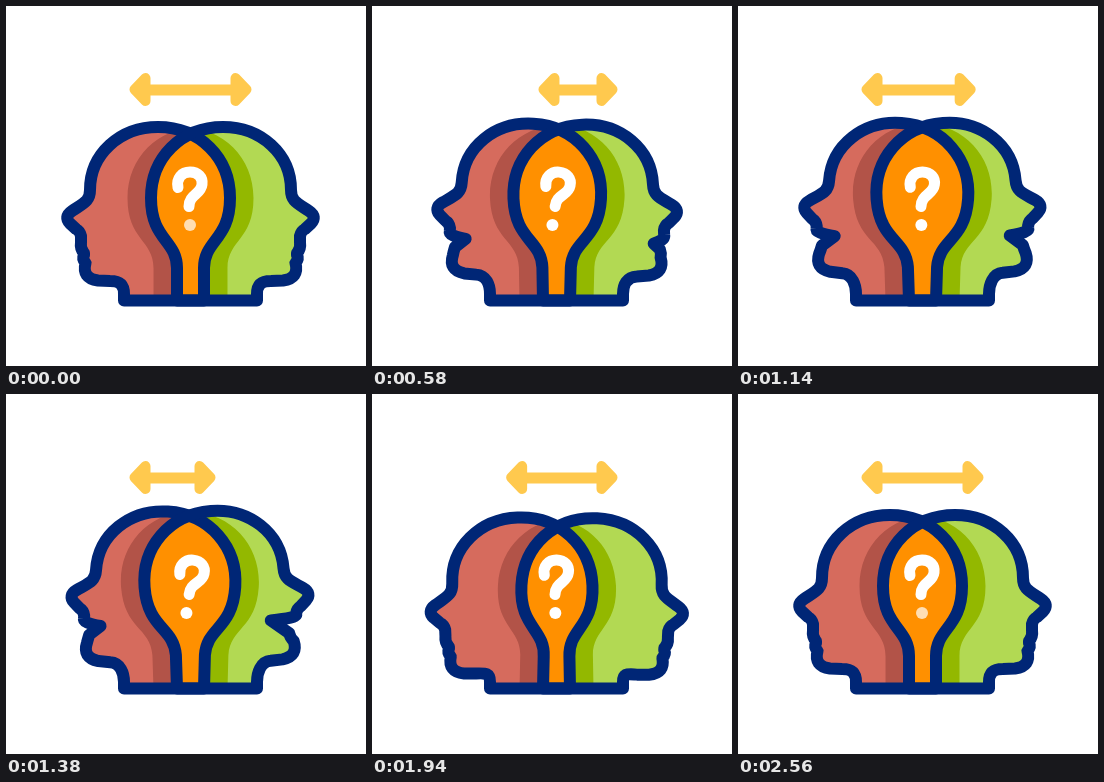
Recreate the animation shown at these times as an HTML page with a canvas. Size 360x360 px, loop 2700 ms.

```html
<!DOCTYPE html>
<html lang="en">
<head>
<meta charset="utf-8">
<title>Two heads, one question</title>
<style>
  html, body { margin: 0; width: 100%; height: 100%; overflow: hidden; background: #fff; }
  canvas { display: block; width: 360px; height: 360px; }
</style>
</head>
<body>
<canvas id="stage"></canvas>
<script>
const canvas = document.getElementById('stage');
const ctx = canvas.getContext('2d');
const scale = window.devicePixelRatio || 1;
canvas.width = canvas.height = 360 * scale;

const LOOP = 2700;
const NAVY = '#002676';
const clamp = (v, lo = 0, hi = 1) => Math.min(hi, Math.max(lo, v));
const smooth = (a, b, t) => { const u = clamp((t - a) / (b - a)); return u * u * (3 - 2 * u); };

// Tilt of each head over time: positive leans back, negative nods forward
const leftTilt = [[0, 0], [80, 0], [300, .3], [580, .85], [900, 1.1], [1380, .9], [1500, .5],
  [1620, -.2], [1700, -.7], [1800, -.8], [1940, -.6], [2200, -.25], [2560, 0], [2700, 0]];
const rightTilt = [[0, 0], [80, 0], [300, .1], [580, .6], [900, 1.08], [1380, 1.1], [1620, .5],
  [1700, .15], [1940, -.75], [2060, -.9], [2200, -.6], [2560, 0], [2700, 0]];

// Smooth curve through the keys
function sample(keys, t) {
  const last = keys.length - 1;
  let i = 0;
  while (i < last - 1 && t >= keys[i + 1][0]) i++;
  const slope = k => {
    if (k < 1 || k >= last) return 0;
    const before = (keys[k][1] - keys[k - 1][1]) / (keys[k][0] - keys[k - 1][0]);
    const after = (keys[k + 1][1] - keys[k][1]) / (keys[k + 1][0] - keys[k][0]);
    return before * after <= 0 ? 0 : 2 * before * after / (before + after);
  };
  const [t0, v0] = keys[i], [t1, v1] = keys[i + 1];
  const h = t1 - t0, u = (t - t0) / h, w = 1 - u;
  return v0 * w * w * (1 + 2 * u) + v1 * u * u * (3 - 2 * u)
    + h * u * w * (slope(i) * w - slope(i + 1) * u);
}

function headPath(tilt, open, mirrored) {
  const path = new Path2D();
  const angle = .07 * tilt, cos = Math.cos(angle), sin = Math.sin(angle);
  const flip = x => mirrored ? 369 - x : x;
  const turn = (x, y) => {
    const dx = x - 211, dy = y - 276;
    return [flip(211 + dx * cos - dy * sin), 276 + dx * sin + dy * cos];
  };
  const turnAll = n => n.flatMap((v, i) => i % 2 ? [] : turn(v, n[i + 1]));
  const line = (...n) => path.lineTo(...turnAll(n));
  const quad = (...n) => path.quadraticCurveTo(...turnAll(n));
  const cubic = (...n) => path.bezierCurveTo(...turnAll(n));

  path.moveTo(flip(118), 294.5);
  path.lineTo(flip(118), 288);
  path.bezierCurveTo(flip(118), 279, ...turnAll([114, 275, 104, 275]));
  line(92, 274.5);
  cubic(81, 273, 77, 267, 79.5, 257);
  quad(76 + 4 * open, 253, 78 + 3 * open, 249);
  line(78 + 13 * open, 247 - 7 * open);
  quad(74, 243 - 5 * open, 75, 236 - 3 * open);
  line(75, 230);
  quad(74, 225, 70, 223);
  line(64, 217.5);
  cubic(60, 213.5, 60, 209, 66, 205);
  cubic(78, 197, 84, 195, 84, 184);
  cubic(84, 148, 114, 121, 152, 121);
  cubic(194, 121, 224, 152, 224, 192);
  cubic(224, 234, 198, 234, 198, 262);
  path.lineTo(flip(198), 294.5);
  path.closePath();
  return path;
}

function fillInside(outer, inner, color, shift = 0) {
  ctx.save();
  ctx.clip(outer);
  ctx.translate(shift, 0);
  ctx.fillStyle = color;
  ctx.fill(inner);
  ctx.restore();
}

function drawHeads(t) {
  const tiltL = sample(leftTilt, t), tiltR = sample(rightTilt, t);
  const speech = .75 * smooth(1000, 1380, t) * (1 - smooth(1600, 1900, t));
  const left = headPath(tiltL, 1.2 * clamp(tiltL), false);
  const right = headPath(tiltR, clamp(tiltR) + speech, true);
  fillInside(left, left, '#d66b5d');
  fillInside(right, right, '#b2d953');
  fillInside(left, right, '#b25348', -23.5);
  fillInside(right, left, '#93b800', 23.5);
  fillInside(left, right, '#ff9000');
  ctx.strokeStyle = NAVY;
  ctx.lineWidth = 12;
  ctx.stroke(left);
  ctx.stroke(right);
}

function drawArrow(t) {
  const dip = center => Math.cos(clamp((t - center) / 350, -1, 1) * Math.PI / 2) ** 2;
  const from = 123 + 43 * (dip(575) + dip(2175));
  const to = 246 - 36 * dip(1383);
  ctx.strokeStyle = ctx.fillStyle = '#ffc94e';
  ctx.lineWidth = 11;
  ctx.beginPath();
  ctx.moveTo(from + 15, 84);
  ctx.lineTo(to - 15, 84);
  ctx.stroke();
  ctx.lineWidth = 10;
  for (const [tip, dir] of [[from, 1], [to, -1]]) {
    ctx.beginPath();
    ctx.moveTo(tip + 5.5 * dir, 83.5);
    ctx.lineTo(tip + 16.5 * dir, 72);
    ctx.lineTo(tip + 16.5 * dir, 95);
    ctx.closePath();
    ctx.fill();
    ctx.stroke();
  }
}

const hook = new Path2D('M172 181.5C170 172.5 176 166 184 166C192 166 197 171.5 196 178.5C195 188.5 183 188.5 183 200.5');

// The hook sways while the dot slides the other way
function drawQuestion(t) {
  const envelope = smooth(80, 300, t) * (1 - smooth(2200, 2560, t));
  const sway = envelope * Math.sin(2 * Math.PI * (t - 580) / 800 - 1.1);
  ctx.strokeStyle = ctx.fillStyle = '#fff';
  ctx.lineWidth = 11;
  ctx.save();
  ctx.translate(184, 202);
  ctx.rotate(-.1 * sway);
  ctx.translate(-184, -202);
  ctx.stroke(hook);
  ctx.restore();
  ctx.globalAlpha = .7 + .3 * envelope;
  ctx.beginPath();
  ctx.arc(184 + 4 * sway, 219, 6, 0, 2 * Math.PI);
  ctx.fill();
  ctx.globalAlpha = 1;
}

function frame(now) {
  const t = now % LOOP;
  ctx.setTransform(scale, 0, 0, scale, 0, 0);
  ctx.fillStyle = '#fff';
  ctx.fillRect(0, 0, 360, 360);
  ctx.lineJoin = ctx.lineCap = 'round';
  drawArrow(t);
  drawHeads(t);
  drawQuestion(t);
}

const start = performance.now();
function loop() {
  frame(performance.now() - start);
  requestAnimationFrame(loop);
}
loop();
</script>
</body>
</html>
```
